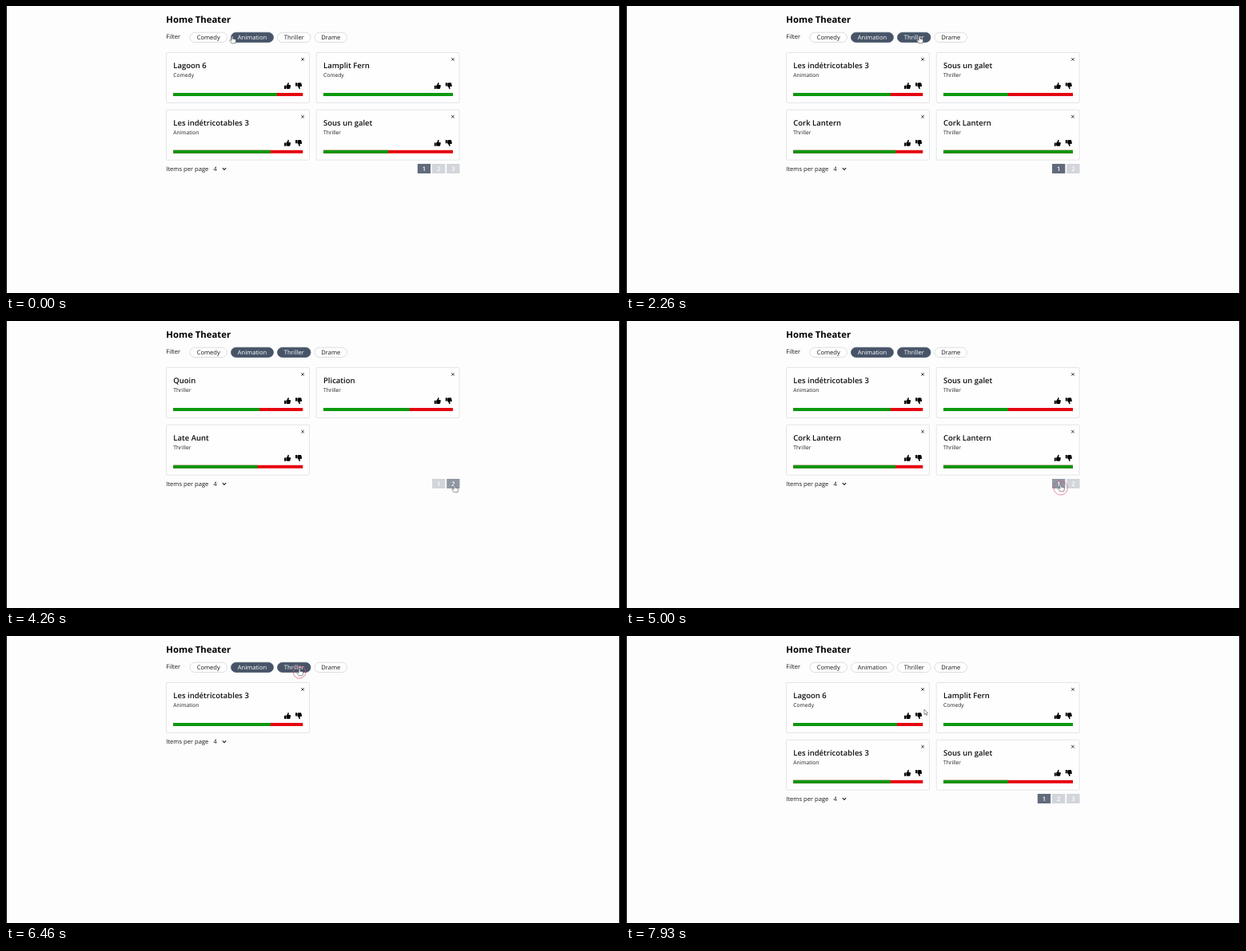
Animation, 768 px wide and 360 px high, one loop 8000 ms. Source, as an HTML page:

```html
<!DOCTYPE html>
<html lang="en">
<head>
<meta charset="utf-8">
<title>Home Theater</title>
<style>
  html, body { margin: 0; width: 100%; height: 100%; overflow: hidden; background: #fdfdfd; }
  svg { display: block; width: 100vw; height: 100vh; }
  text { font: 7.6px "Open Sans", "Noto Sans", sans-serif; fill: #1c1c1c; text-rendering: geometricPrecision; }
  .heading { font-size: 11.35px; font-weight: 700; fill: #000; }
  .title { font-size: 9.5px; font-weight: 600; fill: #111; }
  .genre { font-size: 6.7px; }
  .mid { text-anchor: middle; }
  .light { fill: #fff; }
  .page { font-weight: 600; fill: #fff; }
</style>
</head>
<body>
<svg viewBox="0 0 768 360">
  <defs>
    <path id="thumb" d="M0 3.7H1.9V8H0ZM2.3 4 4.1 1.8 4.3.5Q4.6-.3 5.4.2 6.1.8 5.7 2L5.2 3.1H7.3Q8.3 3.3 8 4.3L7.3 7.2Q7.1 8 6.3 8H4L2.3 7.4Z"/>
  </defs>
  <rect width="768" height="360" fill="#fdfdfd"/>
  <path d="M.5 0V360M767.5 0V360" stroke="#000"/>
  <text class="heading" x="200.3" y="20.6">Home Theater</text>
  <text x="200.3" y="41.3">Filter</text>
  <g id="chips"></g>
  <g id="cards"></g>
  <g id="footer"></g>
  <circle id="ring" fill="none" stroke="#e0527e" stroke-width=".9"/>
  <path id="cursor" fill="#fff" stroke="#4a4a4a" stroke-width=".6" stroke-linejoin="round"/>
</svg>
<script>
const LOOP = 8000, PER_PAGE = 4, ROW = 71.8;
const $ = id => document.getElementById(id);

const chips = [
  { name: 'Comedy', x: 230, w: 46.5 },
  { name: 'Animation', x: 281.5, w: 53 },
  { name: 'Thriller', x: 339.5, w: 41.5 },
  { name: 'Drame', x: 386, w: 40.5 }
];

const film = (title, genre, likes) => ({ title, genre, likes });
const films = [
  film('Lagoon 6', 'Comedy', .8),
  film('Lamplit Fern', 'Comedy', 1),
  film('Les indétricotables 3', 'Animation', .75),
  film('Sous un galet', 'Thriller', .5),
  film('Cork Lantern', 'Thriller', .79),
  film('Cork Lantern', 'Thriller', 1),
  film('Quoin', 'Thriller', .665),
  film('Plication', 'Thriller', .665),
  film('Late Aunt', 'Thriller', .65)
];
const ALL_PAGES = 3;

// Clicks and the view each one leads to.
const clicks = [
  { at: 400, genres: ['Animation'], page: 1 },
  { at: 1880, genres: ['Animation', 'Thriller'], page: 1 },
  { at: 3900, genres: ['Animation', 'Thriller'], page: 2 },
  { at: 4800, genres: ['Animation', 'Thriller'], page: 1 },
  { at: 6300, genres: ['Animation'], page: 1 },
  { at: 7130, genres: [], page: 1 }
];
const start = { genres: [], page: 1 };

// Pointer stops: time, x, y.
const stops = [
  [0, 283, 38], [320, 304, 40], [750, 312, 40], [1130, 346, 33], [1550, 366, 38],
  [2260, 367, 38], [2700, 370, 40], [3400, 567, 206], [3620, 571, 214], [3820, 561, 206],
  [4300, 561, 206], [4500, 550, 214], [4700, 542, 205], [5250, 545, 205],
  [5860, 370, 45], [6150, 367, 41], [6500, 367, 41], [6800, 318, 40],
  [7250, 316, 40], [7800, 373, 92], [LOOP, 373, 92]
];

const HAND = 'M-.8 .2Q0-.6 .8 .2V3.2L3.7 3.8Q4.7 4.1 4.6 5.3L4 8.8H-.8L-3.1 5.5Q-3.5 4.4-2.4 4.3L-.8 5.4Z';
const ARROW = 'M0 0V6.6L1.6 5.2 2.6 7.6 3.6 7.2 2.6 4.9H4.7Z';

function pointerAt(t) {
  const i = stops.findIndex(s => s[0] > t);
  const [t0, x0, y0] = stops[i - 1], [t1, x1, y1] = stops[i];
  const k = (t - t0) / (t1 - t0), e = k * k * (3 - 2 * k);
  return { x: x0 + (x1 - x0) * e, y: y0 + (y1 - y0) * e };
}

const inside = (p, x, y, w, h) => p.x >= x && p.x <= x + w && p.y >= y && p.y <= y + h;

function chipMarkup({ name, x, w }, dark) {
  const fill = dark ? '#475468' : '#fefefe', edge = dark ? '#475468' : '#cfd1d4';
  return `<rect x="${x}" y="33.2" width="${w}" height="12.3" rx="6.15" fill="${fill}" stroke="${edge}" stroke-width=".7"/>
    <text class="mid ${dark ? 'light' : ''}" x="${x + w / 2}" y="42.4">${name}</text>`;
}

function cardMarkup({ title, genre, likes }, i) {
  const x = 200.5 + i % 2 * 187.7, y = 58.4 + Math.floor(i / 2) * ROW;
  return `<g transform="translate(${x} ${y})">
    <rect width="179" height="63" rx="1.5" fill="#fefefe" stroke="#d9dadc" stroke-width=".7"/>
    <text class="title" x="8.8" y="19.7">${title}</text>
    <text class="genre" x="8.8" y="30.5">${genre}</text>
    <path d="M168.9 6.8l3.4 3.4m0-3.4l-3.4 3.4" stroke="#222" stroke-width=".9"/>
    <use href="#thumb" x="147.6" y="37.6"/>
    <use href="#thumb" transform="translate(161.6 45.8) scale(1 -1)"/>
    <rect x="8.8" y="50.6" width="162" height="4" fill="#e60510"/>
    <rect x="8.8" y="50.6" width="${162 * likes}" height="4" fill="#0c980f"/>
  </g>`;
}

function pageMarkup(n, x, y, current, over) {
  const fill = over ? '#9097a3' : n === current ? '#626b7b' : '#d2d5da';
  return `<rect x="${x}" y="${y}" width="16.3" height="12" fill="${fill}"/>
    <text class="page mid" x="${x + 8.1}" y="${y + 8.9}">${n}</text>`;
}

let lastKey = '';
function draw(t) {
  const click = clicks.filter(c => c.at <= t).pop();
  const { genres, page } = click || start;
  const p = pointerAt(t);

  const matches = genres.length ? films.filter(f => genres.includes(f.genre)) : films;
  const pages = genres.length ? Math.ceil(matches.length / PER_PAGE) : ALL_PAGES;
  const shown = matches.slice((page - 1) * PER_PAGE, page * PER_PAGE);
  const top = 126.2 + (Math.ceil(shown.length / 2) - 1) * ROW;
  const pageX = n => 551.2 - (pages - n) * 18.2;

  const overChip = chips.findIndex(c => inside(p, c.x, 33.3, c.w, 12.2));
  let overPage = 0;
  if (pages > 1) {
    for (let n = 1; n <= pages; n++) if (inside(p, pageX(n), top, 16.3, 12)) overPage = n;
  }

  const key = [genres, page, overChip, overPage].join('|');
  if (key !== lastKey) {
    lastKey = key;
    $('chips').innerHTML = chips.map((c, i) => chipMarkup(c, i === overChip || genres.includes(c.name))).join('');
    $('cards').innerHTML = shown.map(cardMarkup).join('');
    let foot = `<text x="200.3" y="${top + 9}">Items per page</text><text x="259.6" y="${top + 9}">4</text>
      <path d="M270.8 ${top + 5.2}l2.2 2.2 2.2-2.2" fill="none" stroke="#222" stroke-width="1.1"/>`;
    if (pages > 1) {
      for (let n = 1; n <= pages; n++) foot += pageMarkup(n, pageX(n), top, page, n === overPage);
    }
    $('footer').innerHTML = foot;
  }

  const cursor = $('cursor');
  cursor.setAttribute('d', overChip >= 0 || overPage ? HAND : ARROW);
  cursor.setAttribute('transform', `translate(${p.x} ${p.y})`);

  const age = click ? (t - click.at) / 300 : 1;
  const ring = $('ring');
  ring.setAttribute('cx', p.x);
  ring.setAttribute('cy', p.y + 4.5);
  ring.setAttribute('r', 4 + 7 * Math.min(age, 1));
  ring.setAttribute('opacity', age < 1 ? 1 - age * .4 : 0);
}

const begin = performance.now();
function tick() {
  draw((performance.now() - begin) % LOOP);
  requestAnimationFrame(tick);
}
tick();
</script>
</body>
</html>
```
